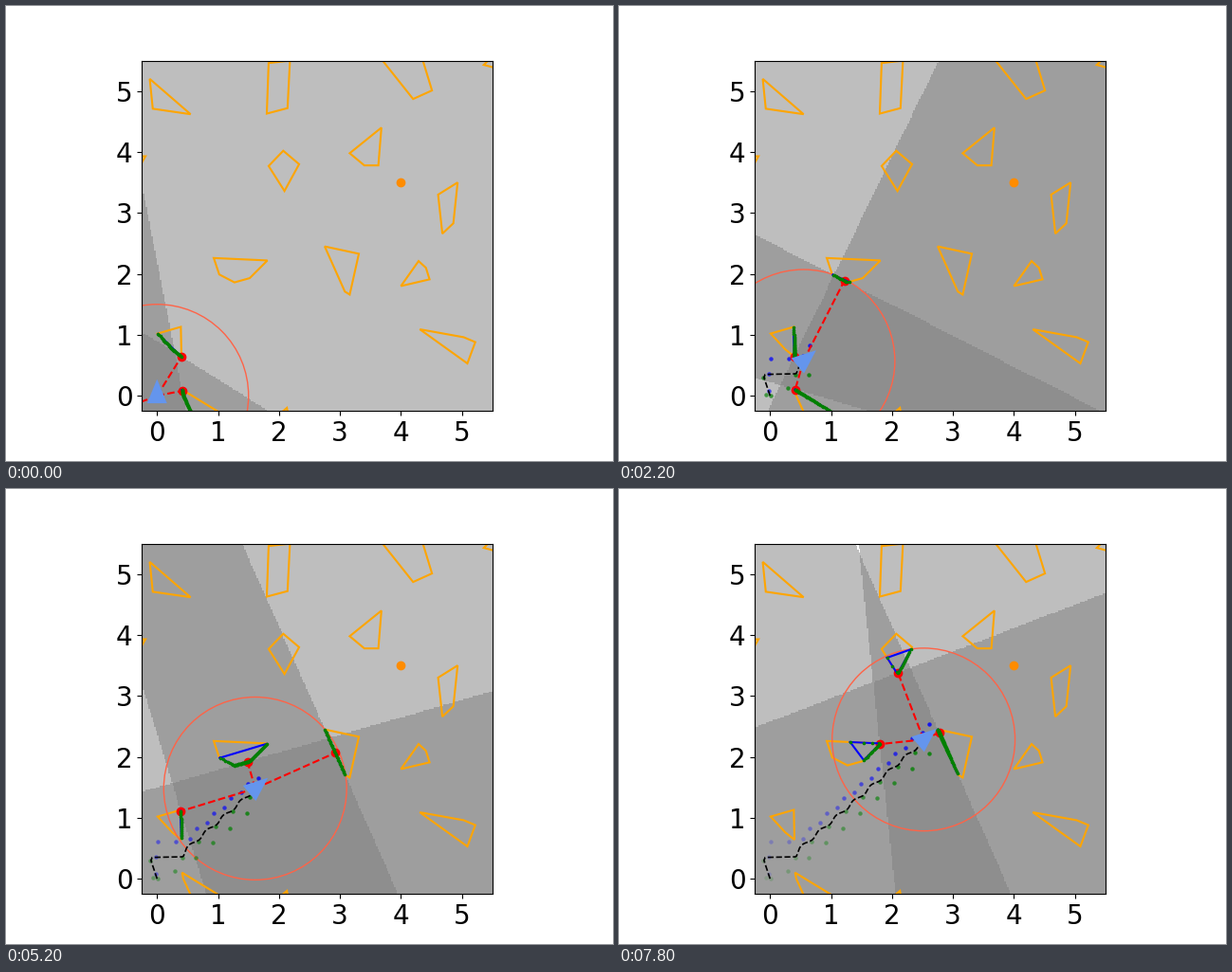
These frames come from a looping animation (640x480 px, 8 s). A matplotlib script:

```python
import numpy as np
import matplotlib.pyplot as plt
from matplotlib.animation import FuncAnimation

FRAMES = 40
LOW, HIGH = -0.25, 5.5
RANGE = 1.5
GOAL = (4, 3.5)


def chip(x, y, deg, r=0.12):
    """Small triangle with its tip at (x, y), pointing along deg."""
    ang = np.radians(deg + np.array([0, 120, 240]))
    tip = np.column_stack([np.cos(ang), np.sin(ang)])
    return (x, y) + r * (tip - tip[0])


OBSTACLES = [np.array(p) for p in (
    [(-0.12, 5.2), (-0.07, 4.71), (0.55, 4.62)],
    [(1.83, 5.46), (2.18, 5.5), (2.14, 4.72), (1.8, 4.63)],
    [(3.62, 5.6), (4.2, 4.87), (4.51, 5.01), (4.33, 5.6)],
    [(2.07, 4.02), (2.33, 3.8), (2.09, 3.36), (1.83, 3.77)],
    [(3.68, 4.4), (3.63, 3.78), (3.4, 3.78), (3.16, 3.98)],
    [(4.93, 3.5), (4.86, 2.83), (4.68, 2.66), (4.61, 3.3)],
    [(0.93, 2.26), (1.81, 2.22), (1.52, 1.93), (1.27, 1.86), (1.02, 1.99)],
    [(2.75, 2.45), (3.31, 2.33), (3.16, 1.66), (3.08, 1.71)],
    [(4.29, 2.21), (4.41, 2.1), (4.47, 1.91), (4, 1.8)],
    [(4.31, 1.09), (5.03, 0.96), (5.22, 0.88), (5.09, 0.53)],
    [(0.01, 1.02), (0.39, 1.13), (0.4, 0.64), (0.25, 0.76)],
    [(0.41, 0.1), (1.05, -0.29), (0.58, -0.33), (0.43, 0)],
    chip(5.36, 5.43, 195),
    chip(2.13, -0.2, 70),
    chip(-0.19, 3.93, 30),
    chip(-0.92, -0.36, 0),
    chip(-0.91, 1.54, -57),
)]


def body(t):
    """Body position: turn out of the start, then a swaying straight walk."""
    if t < 10:
        end = body(10)
        times = [0, 4, 5, 8.6, 10]
        return np.array([np.interp(t, times, [0, -0.1, -0.08, 0.43, end[0]]),
                         np.interp(t, times, [0, 0.3, 0.35, 0.36, end[1]])])
    sway = 0.0233 * np.cos(np.pi / 2 * (t - 14.7))
    return np.array([0.772 + 0.0704 * (t - 14) - 0.66 * sway,
                     0.739 + 0.0612 * (t - 14) + 0.75 * sway])


def steps(k):
    """Left and right footprints of step k."""
    t = 2 * k + 1
    left = body(t) + np.array([0.098, 0.26]) * min(1, k / 2)
    right = body(t) + (0.025, -0.14) - np.array([0.06, -0.087]) * (-1) ** k
    return left, right


def cross(a, b):
    return a[..., 0] * b[..., 1] - a[..., 1] * b[..., 0]


def scan(pos, rays=360):
    """Lidar hits grouped by obstacle."""
    ang = np.arange(rays) * 2 * np.pi / rays
    beam = np.column_stack([np.cos(ang), np.sin(ang)])
    dist = np.full((len(OBSTACLES), rays), np.inf)
    for row, poly in zip(dist, OBSTACLES):
        for a, b in zip(poly, np.roll(poly, -1, axis=0)):
            edge = b - a
            den = cross(beam, edge)
            den = np.where(np.abs(den) < 1e-9, 1e-9, den)
            reach = cross(a - pos, edge) / den
            along = cross(a - pos, beam) / den
            hit = (reach > 0) & (along >= 0) & (along <= 1)
            row[hit] = np.minimum(row, reach)[hit]
    first = dist.argmin(axis=0)
    groups = []
    for i, row in enumerate(dist):
        seen = (first == i) & (row <= RANGE)
        if seen.any():
            groups.append(pos + beam[seen] * row[seen, None])
    return groups


def hull(points):
    pts = sorted(map(tuple, points))

    def chain(seq):
        out = []
        for p in seq:
            while len(out) > 1 and cross(np.subtract(out[-1], out[-2]),
                                         np.subtract(p, out[-2])) <= 0:
                out.pop()
            out.append(p)
        return out
    loop = chain(pts)[:-1] + chain(pts[::-1])
    return np.array(loop if len(loop) > 1 else pts)


fig, ax = plt.subplots(figsize=(6.4, 4.8), dpi=100)
ax.set_aspect("equal")
ax.set_xlim(LOW, HIGH)
ax.set_ylim(LOW, HIGH)
ax.set_xticks(range(6))
ax.set_yticks(range(6))
ax.tick_params(labelsize=20)

for poly in OBSTACLES:
    ax.fill(*poly.T, color="orange", alpha=0.2, lw=0, zorder=0.5)
    ax.add_patch(plt.Polygon(poly, fill=False, ec="orange", lw=1.5, zorder=1.2))
ax.plot(*GOAL, "o", color="darkorange", ms=6, zorder=1.3)

CELLS = 250
mid = LOW + (np.arange(CELLS) + 0.5) * (HIGH - LOW) / CELLS
GX, GY = np.meshgrid(mid, mid)
shade = ax.imshow(np.zeros((CELLS, CELLS, 4)), extent=(LOW, HIGH, LOW, HIGH),
                  origin="lower", interpolation="nearest", zorder=1)
ring = ax.add_patch(plt.Circle((0, 0), RANGE, fill=False, ec="tomato", lw=1, zorder=1.4))
trail, = ax.plot([], [], "k--", lw=1.2, zorder=1.6)
robot = ax.add_patch(plt.Polygon([(0, 0)] * 3, color="cornflowerblue", lw=0, zorder=2.3))
SHAPE = np.array([(0.272, 0), (-0.124, 0.163), (-0.124, -0.163)])
extras = []


def add(xy, fmt, **style):
    xy = np.atleast_2d(xy)
    extras.extend(ax.plot(xy[:, 0], xy[:, 1], fmt, **style))


def draw(n):
    while extras:
        extras.pop().remove()
    pos = body(n)

    # each seen obstacle shades the half-plane on the robot's side
    count = np.zeros((CELLS, CELLS), int)
    for hits in scan(pos):
        near = hits[np.hypot(*(hits - pos).T).argmin()]
        d = near - pos
        count += (GX - near[0]) * d[0] + (GY - near[1]) * d[1] <= 0
        add([pos, near], "r--", lw=1.5, zorder=1.8)
        add(near, "ro", ms=6, zorder=1.9)
        edge = hull(hits)
        add(np.vstack([edge, edge[:1]]), "b-", lw=1.5, zorder=2)
        add(hits, "o", color="green", ms=2.6, mew=0, zorder=2.1)

    rgba = np.ones((CELLS, CELLS, 4))
    rgba[..., :3] = ((126 + 129 * 0.5 ** count) / 255)[..., None]
    rgba[..., 3] = count > 0
    shade.set_data(rgba)

    for k in range((n + 1) // 2):
        alpha = 0.85 - 0.019 * (n - 1 - 2 * k)
        for spot, color in zip(steps(k), ("blue", "green")):
            add(spot, "o", color=color, ms=3.2, mew=0, alpha=alpha, zorder=1.5)

    path = np.array([body(t) for t in np.arange(0, n + 0.01, 0.25)])
    trail.set_data(path[:, 0], path[:, 1])
    ring.center = tuple(pos)
    turn = np.radians(np.interp(n, [0, 4, 7], [90, 45, 40]))
    c, s = np.cos(turn), np.sin(turn)
    robot.set_xy(pos + SHAPE @ np.array([(c, s), (-s, c)]))
    return [shade, ring, trail, robot, *extras]


anim = FuncAnimation(fig, draw, frames=FRAMES, interval=200, init_func=lambda: draw(0),
                     repeat=True, repeat_delay=0, blit=False)
plt.show()
```
